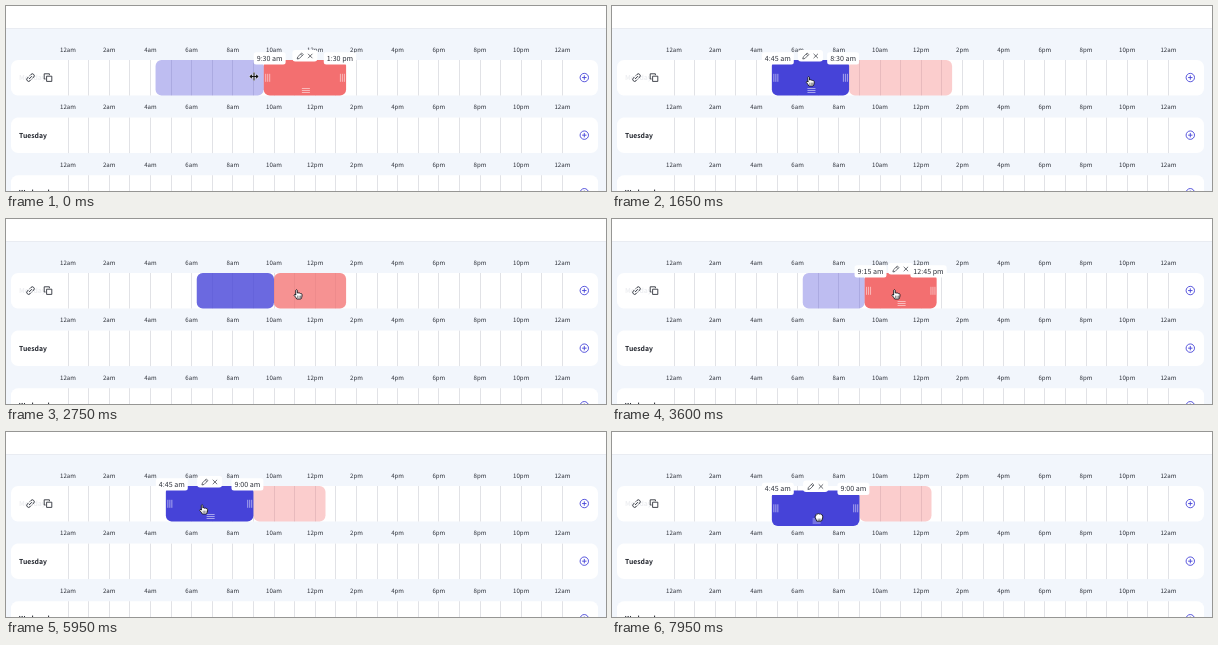
Animation of 600x185 px, one loop 8000 ms. Source, as an HTML page with a canvas:

```html
<!DOCTYPE html>
<html lang="en">
<head>
<meta charset="utf-8">
<title>Weekly schedule</title>
<style>
  html, body { margin: 0; width: 100%; height: 100%; overflow: hidden; background: #f2f6fc; }
  canvas { display: block; width: 600px; height: 185px; }
</style>
</head>
<body>
<canvas id="stage"></canvas>
<script>
const WIDTH = 600, HEIGHT = 185, LOOP = 8000, STEP = 50;
const BLUE = '#4643d8', RED = '#f36f70', INK = '#2f333c';
const FONT = '"Noto Sans CJK JP", "Noto Sans CJK SC", "Noto Sans CJK", "Noto Sans", sans-serif';
const ROW_TOP = 54, ROW_HEIGHT = 35.5, ROW_PITCH = 57.6, HOUR = 20.6;

const canvas = document.getElementById('stage');
const ctx = canvas.getContext('2d');
const scale = window.devicePixelRatio || 1;
canvas.width = WIDTH * scale;
canvas.height = HEIGHT * scale;
ctx.textRendering = 'geometricPrecision';

const clamp = v => Math.min(1, Math.max(0, v));
const toQuarter = hours => Math.round(hours * 4) / 4;
const hourX = hours => 62 + hours * HOUR;
const suffix = hours => hours % 24 < 12 ? 'am' : 'pm';
const hour12 = hours => Math.floor(hours) % 12 || 12;
const clock = hours =>
  `${hour12(hours)}:${String(hours % 1 * 60).padStart(2, '0')} ${suffix(hours)}`;

// Pointer drags move block edges in quarter hours; hovering moves the focus.
function poseAt(t) {
  const linear = (from, to) => clamp((t - from) / (to - from));
  const ease = (from, to) => { const p = linear(from, to); return p * p * (3 - 2 * p); };
  const fade = from => linear(from, from + 160);

  const shrinkRed = ease(0, 400), trimBlue = ease(950, 1250), pushRight = ease(1800, 2400);
  const pushLeft = ease(2860, 3860), growBlue = ease(4700, 5300);
  const toBlue = ease(1300, 1650), toEdge = ease(3900, 4600);
  const toBody = ease(5450, 5900), toBottom = ease(6050, 6950);

  return {
    start: toQuarter(4.25 + .5 * trimBlue + 1.5 * pushRight - 1.5 * growBlue),
    middle: toQuarter(9.5 - shrinkRed + 1.5 * pushRight - pushLeft),
    end: toQuarter(13.5 - pushLeft),
    redFocus: 1 - fade(420) + fade(2650) - fade(4200),
    blueFocus: fade(420) - fade(2700) + fade(4200),
    lift: 4.5 * linear(7150, 7250),
    x: 248 - 11 * shrinkRed - 87 * ease(400, 800) + HOUR * (.5 * trimBlue + 1.5 * pushRight)
      + 38 * toBlue + 72 * ease(2400, 2850) - HOUR * (pushLeft + 1.5 * growBlue)
      - 89 * toEdge + 37 * toBody + 9 * toBottom,
    y: 70.5 + 4.5 * toBlue - 4 * toEdge + 6 * toBody + 8 * toBottom
  };
}

function box(x, y, w, h, r, color) {
  ctx.fillStyle = color;
  ctx.beginPath();
  ctx.roundRect(x, y, w, h, r);
  ctx.fill();
}

function text(str, x, baseline, size, { align = 'center', weight = 500, color = INK } = {}) {
  ctx.font = `${weight} ${size}px ${FONT}`;
  ctx.textAlign = align;
  ctx.fillStyle = color;
  ctx.fillText(str, x, baseline);
}

function strokePath(d, color, width) {
  ctx.strokeStyle = color;
  ctx.lineWidth = width;
  ctx.stroke(new Path2D(d));
}

function at(x, y, draw, angle = 0) {
  ctx.save();
  ctx.translate(x, y);
  ctx.rotate(angle);
  draw();
  ctx.restore();
}

function drawRow(day, index) {
  const top = ROW_TOP + index * ROW_PITCH, middle = top + ROW_HEIGHT / 2;
  box(5, top, 587, ROW_HEIGHT, 7, '#fff');
  for (let h = 0; h <= 24; h++) {
    if (h % 2 === 0) text(hour12(h) + suffix(h), hourX(h), top - 8.5, 6.1);
    ctx.fillStyle = '#e1e2e6';
    ctx.fillRect(Math.round(hourX(h) - .5), top, 1, ROW_HEIGHT);
  }
  text(day, 13, middle + 2.3, 6.8, { align: 'left', weight: 700, color: index ? '#20242c' : '#eeeff2' });
  at(578.3, middle - .2, () =>
    strokePath('M4.2 0A4.2 4.2 0 1 1-4.2 0A4.2 4.2 0 1 1 4.2 0M-2.2 0H2.2M0-2.2V2.2', BLUE, .9));
}

function drawRowIcons() {
  at(24.5, 71.6, () =>
    strokePath('M-.8-1.9H-2.6A1.9 1.9 0 0 0-2.6 1.9H-.8M.8-1.9H2.6A1.9 1.9 0 0 1 2.6 1.9H.8M-2 0H2', INK, .9),
    -Math.PI / 4);
  at(42, 71.6, () => {
    ctx.lineJoin = 'round';
    strokePath('M-1.4-1.4H3.8V3.8H-1.4ZM-2.4 1.4H-3.8V-3.8H1.4V-2.4', INK, .9);
  });
}

function drawBlock(start, end, color, focus, dy) {
  ctx.globalAlpha = .35 + .65 * focus;
  box(hourX(start), ROW_TOP + dy, hourX(end) - hourX(start), ROW_HEIGHT, 6, color);
  ctx.globalAlpha = 1;
}

function drawTimeLabel(hours, edge, isEnd, dy) {
  const label = clock(hours), size = 7.1;
  ctx.font = `400 ${size}px ${FONT}`;
  const width = ctx.measureText(label).width + 6;
  const x = isEnd ? edge + 10 - width : edge - 10;
  box(x, 46.3 + dy, width, 12.2, 2.5, '#fff');
  text(label, x + 3, 54.7 + dy, size, { align: 'left', weight: 400 });
}

function drawControls(start, end, focus, dy) {
  const left = hourX(start), right = hourX(end), center = (left + right) / 2;
  const grip = () => strokePath('M-2-4V4M0-4V4M2-4V4', 'rgba(255,255,255,.65)', .8);
  ctx.globalAlpha = clamp(focus * 4 - 3);
  at(left + 4, 71.8 + dy, grip);
  at(right - 3.7, 71.8 + dy, grip);
  at(center + 1, 84.5 + dy, grip, Math.PI / 2);
  drawTimeLabel(start, left, false, dy);
  drawTimeLabel(end, right, true, dy);
  box(center - 12.5, 44 + dy, 25, 11.5, 3, '#fff');
  at(center - 4.7, 50 + dy, () =>
    strokePath('M-3 3L-2.5 .9L1.4-3L3-1.4L-.9 2.5ZM.4-2L2-.4', INK, .7));
  at(center + 5.3, 50 + dy, () => strokePath('M-2.2-2.2L2.2 2.2M2.2-2.2L-2.2 2.2', INK, .7));
  ctx.globalAlpha = 1;
}

function drawResizeCursor() {
  const shape = 'M-3.2 0H3.2M0-3.6V3.6M-2.3-1.4L-3.8 0L-2.3 1.4M2.3-1.4L3.8 0L2.3 1.4';
  strokePath(shape, 'rgba(255,255,255,.8)', 2);
  strokePath(shape, '#111', 1.1);
}

function drawHandCursor(grabbing) {
  const shape = grabbing
    ? 'M-3.6 0Q-4-1.5-2.6-1.5V-2.4Q-2-3.7-.9-2.9Q0-3.9 1-2.9Q2.2-3.6 2.7-2.3Q4-2.4 4-.8V1Q3.8 3 2.6 4.2H-1.6Z'
    : 'M-2.4 .6V-3.7Q-1.6-5-.8-3.7V-1Q0-1.8 .8-.8Q1.7-1.4 2.4-.4Q3.7-.8 3.9 .6V2Q3.7 3.6 2.8 5H-1.4Q-2.4 3-4 1.4Q-4.2 0-2.4 .6Z';
  ctx.fillStyle = '#fff';
  ctx.fill(new Path2D(shape));
  strokePath(shape, '#16161c', .9);
  strokePath('M-.5 2V3.6M1 2V3.6M2.4 2V3.6', '#16161c', .5);
}

function drawCursor({ x, y, start, middle, lift }) {
  const nearEdge = [start, middle].some(edge => Math.abs(x - hourX(edge)) < 10);
  at(x, y, () => {
    ctx.lineJoin = ctx.lineCap = 'round';
    if (nearEdge) drawResizeCursor();
    else drawHandCursor(lift > 0);
  });
}

function render(t) {
  ctx.setTransform(scale, 0, 0, scale, 0, 0);
  ctx.fillStyle = '#f2f6fc';
  ctx.fillRect(0, 0, WIDTH, HEIGHT);
  ctx.fillStyle = '#fff';
  ctx.fillRect(0, 0, WIDTH, 22);
  ctx.fillStyle = '#e9ecf2';
  ctx.fillRect(0, 22, WIDTH, 1);

  ['Monday', 'Tuesday', 'Wednesday'].forEach(drawRow);
  drawRowIcons();

  const pose = poseAt(t);
  const { start, middle, end, redFocus, blueFocus, lift } = pose;
  drawBlock(middle, end, RED, redFocus, 0);
  drawBlock(start, middle, BLUE, blueFocus, lift);
  drawControls(middle, end, redFocus, 0);
  drawControls(start, middle, blueFocus, lift);
  drawCursor(pose);
}

function tick() {
  const t = performance.now() % LOOP;
  render(Math.floor(t / STEP) * STEP);
  requestAnimationFrame(tick);
}
tick();
</script>
</body>
</html>
```
